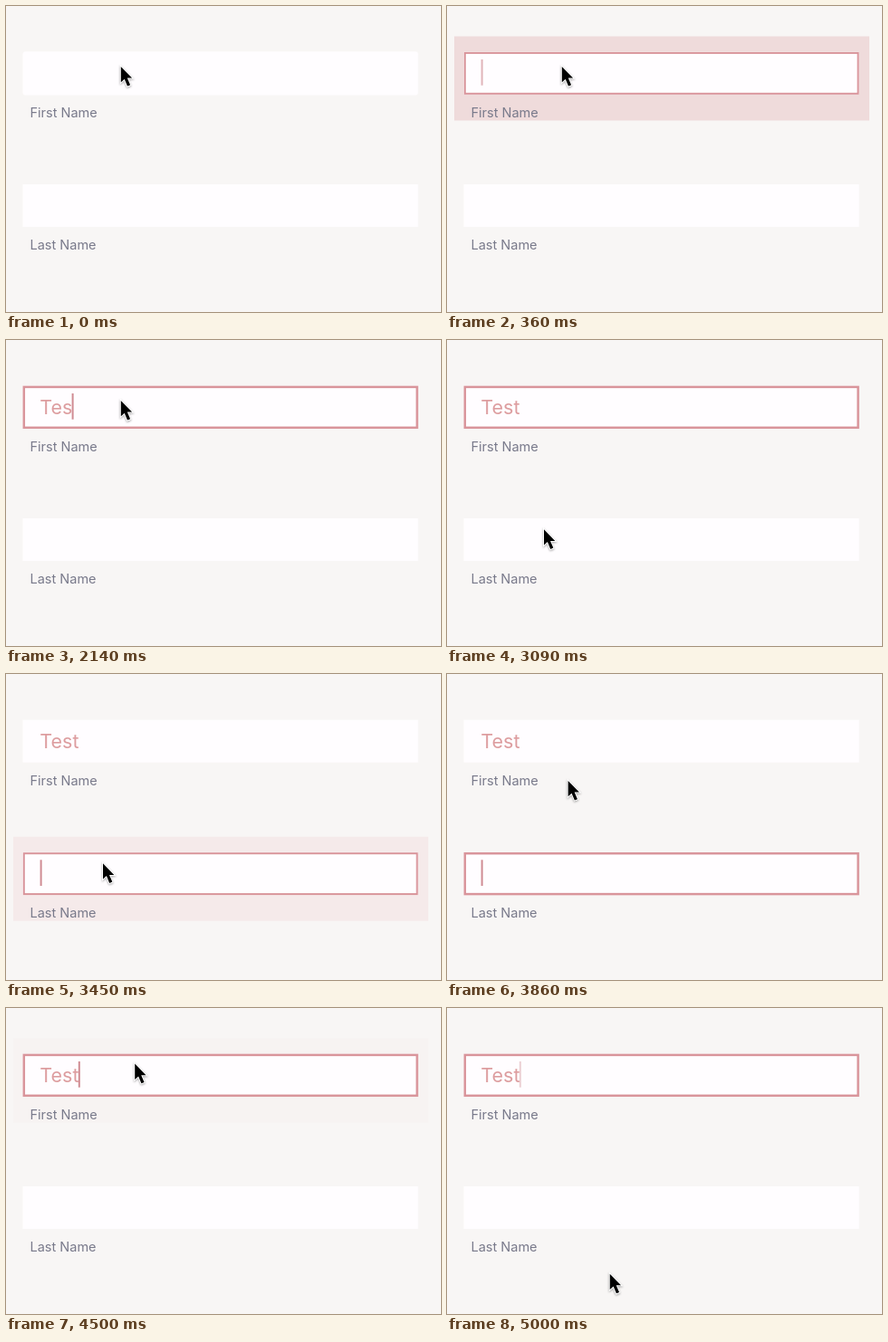
An HTML page for the animation above (5.05 s loop, 480 px wide and 338 px high).

```html
<!DOCTYPE html>
<html lang="en">
<head>
<meta charset="utf-8">
<title>Form focus ripple</title>
<style>
  html, body { margin: 0; height: 100%; overflow: hidden; background: #f8f6f5; }
  svg { display: block; width: 480px; height: 338px; }
  text { font-family: Inter, "Liberation Sans", sans-serif; }
  .ripple { fill: #d9949a; }
  .box { fill: #fffdff; }
  .border { fill: none; stroke: #d9959b; }
  .label { font-size: 14.5px; fill: #797a8b; }
  .value { font-size: 21.5px; fill: #dd9d9f; }
  .caret { fill: #d08c93; }
  #pointer { filter: drop-shadow(0 1px 1px rgba(0, 0, 0, .35)); }
</style>
</head>
<body>
<svg viewBox="0 0 480 338">
  <g class="field">
    <rect class="ripple" x="8" width="458"/>
    <rect class="box" x="18.5" y="50.7" width="436.2" height="47"/>
    <rect class="border" x="19.8" y="51.9" width="433.8" height="44.9"/>
    <text class="label" x="26.5" y="122.7">First Name</text>
    <text class="value" x="37.3" y="82"></text>
    <rect class="caret" y="59" width="2" height="28.7"/>
  </g>
  <g class="field" transform="translate(0 146.3)">
    <rect class="ripple" x="8" width="458"/>
    <rect class="box" x="18.5" y="50.7" width="436.2" height="47"/>
    <rect class="border" x="19.8" y="51.9" width="433.8" height="44.9"/>
    <text class="label" x="26.5" y="122.7">Last Name</text>
    <text class="value" x="37.3" y="82"></text>
    <rect class="caret" y="59" width="2" height="28.7"/>
  </g>
  <path id="pointer" d="M0 0V17.3L3.9 13.8 7.2 21.6 10.3 20.3 7 12.6H12.3Z"
        stroke="#fff" stroke-width="2" paint-order="stroke"/>
</svg>
<script>
const LOOP = 5050, TICKS_PER_MS = 0.022, LAST_TICK = 110;
const focuses = [{ at: 318, field: 0 }, { at: 3363, field: 1 }, { at: 4363, field: 0 }];
const keys = [1770, 1860, 2130, 2270];
const caretX = [37.6, 50.3, 61.5, 72.6, 79.8];
// Caret visibility: start, start of fade-out, fade-in length
const blinks = [[363, 930, 1], [1409, 2790, 91], [3408, 3864, 1], [4408, 4864, 1]];
const FADE = 227;
// Pointer moves: start, end, from, to, horizontal easing power
const moves = [
  [2545, 3091, [126.8, 67], [107, 209.3], 1],
  [3550, 4091, [107, 209.3], [142.2, 61.6], 0.58],
  [4680, 5025, [142.2, 61.6], [180.3, 297.3], 1]
];

const clamp = v => Math.max(0, Math.min(1, v));
const smooth = v => v * v * (3 - 2 * v);
const set = (el, attrs) => { for (const k in attrs) el.setAttribute(k, attrs[k]); };
const pointer = document.getElementById("pointer");
const fields = [...document.querySelectorAll(".field")].map(g => {
  const part = name => g.querySelector("." + name);
  return { ripple: part("ripple"), box: part("box"), border: part("border"),
           value: part("value"), caret: part("caret") };
});

function caretAlpha(t) {
  return Math.max(...blinks.map(([start, fade, rise]) =>
    clamp((t - start) / rise) * clamp(1 - (t - fade) / FADE)));
}

function pointerAt(t) {
  let pos = moves[0][2];
  for (const [start, end, a, b, power] of moves) {
    if (t < start) break;
    const p = smooth(clamp((t - start) / (end - start)));
    pos = [a[0] + (b[0] - a[0]) * p ** power, a[1] + (b[1] - a[1]) * p];
  }
  return pos;
}

function draw(t) {
  const started = focuses.filter(f => t >= f.at).pop();
  const active = focuses.filter(f => t >= f.at + 20).pop();
  const typed = keys.filter(k => t >= k).length;
  fields[0].value.textContent = "Test".slice(0, typed);

  fields.forEach((f, i) => {
    const age = started && started.field === i ? t - started.at : LOOP;
    const spread = 4 + age * 0.6;
    const top = Math.max(33.5, 50 - spread), bottom = Math.min(126.5, 98 + spread);
    set(f.ripple, { y: top, height: bottom - top, opacity: 0.5 * clamp(1 - age / 182) ** 2 });

    const on = active && active.field === i;
    set(f.border, { opacity: on ? 1 : 0, "stroke-width": age < 100 ? 2 : 2.5 });
    set(f.caret, { x: caretX[i ? 0 : typed], opacity: on ? caretAlpha(t) : 0 });
  });

  const fresh = !started;
  set(fields[0].box, { y: fresh ? 50.2 : 50.7, height: fresh ? 48.2 : 47, rx: fresh ? 3 : 0 });
  set(pointer, { transform: `translate(${pointerAt(t)})` });
}

const origin = performance.now();
function frame() {
  const t = (performance.now() - origin) % LOOP;
  draw(Math.min(LAST_TICK, Math.floor((t + 5) * TICKS_PER_MS)) / TICKS_PER_MS);
  requestAnimationFrame(frame);
}
frame();
</script>
</body>
</html>
```
